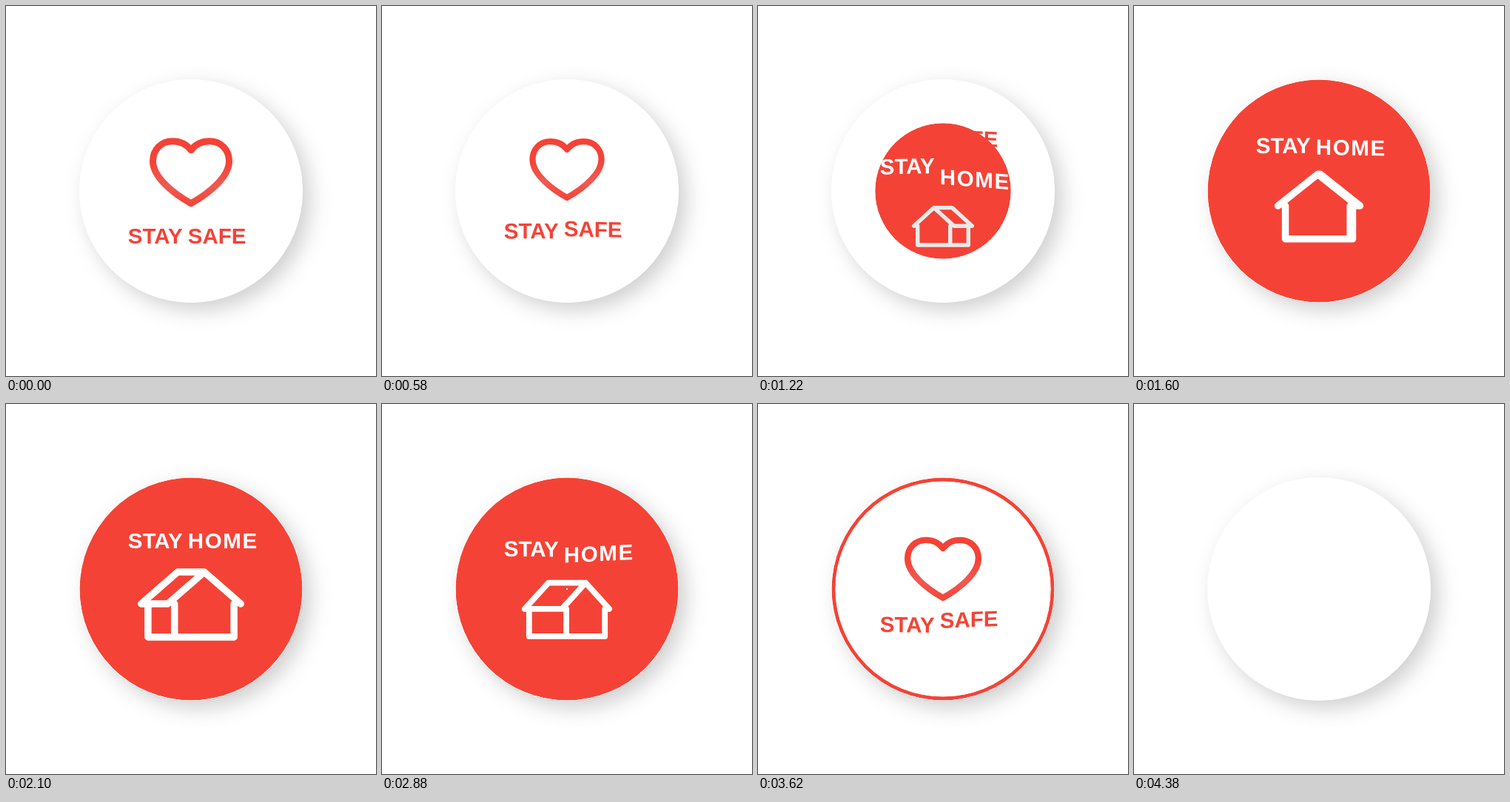
Recreate the animation shown at these times as an HTML page. Size 500 by 500 pixels, loop 4400 ms.

```html
<!DOCTYPE html>
<html lang="en">
<head>
<meta charset="utf-8">
<title>Stay safe, stay home</title>
<style>
  html, body { margin: 0; width: 100%; height: 100%; overflow: hidden; background: #fff; }
  svg { display: block; width: 100%; height: 100%; }
  text { font: bold 29.5px "Liberation Sans", Arial, sans-serif; }
  .disc { filter: drop-shadow(10px 10px 14px rgba(0, 0, 0, .19)); }
  .icon { fill: none; stroke-linecap: round; stroke-linejoin: round; }
</style>
</head>
<body>
<svg viewBox="0 0 500 500">
  <defs>
    <linearGradient id="glow" gradientUnits="userSpaceOnUse" x1="0" y1="-46" x2="0" y2="46">
      <stop offset=".35" stop-color="#f44336"/>
      <stop offset=".7" stop-color="#ee5a52"/>
      <stop offset="1" stop-color="#f44336"/>
    </linearGradient>
    <clipPath id="safeClip"><circle cx="250" cy="250" r="151"/></clipPath>
    <clipPath id="homeClip"><circle cx="250" cy="250" r="151"/></clipPath>
  </defs>
  <circle class="disc" cx="250" cy="250" r="151" fill="#fff"/>
  <g id="stage">
    <g id="safe" clip-path="url(#safeClip)">
      <circle cx="250" cy="250" fill="#fff"/>
      <g class="content" fill="#f44336">
        <path class="icon" stroke="url(#glow)" stroke-width="9"
          d="M0-30C-6-38-15-42-25-42C-41-42-51.5-30-51.5-15C-51.5 6-25 28 0 42C25 28 51.5 6 51.5-15C51.5-30 41-42 25-42C15-42 6-38 0-30Z"/>
        <text>STAY</text><text>SAFE</text>
      </g>
    </g>
    <g id="home" clip-path="url(#homeClip)">
      <circle cx="250" cy="250" fill="#f44336"/>
      <g class="content" fill="#fff">
        <path class="icon" stroke="#fff" stroke-width="9.5"/>
        <text>STAY</text><text letter-spacing="1.6">HOME</text>
      </g>
    </g>
  </g>
</svg>
<script>
const LOOP = 4400, HALF = 2200;
const stage = document.getElementById('stage');

function makeScene(id, opts) {
  const el = document.getElementById(id);
  return Object.assign({
    el,
    disc: el.querySelector('circle'),
    clip: document.querySelector(`#${id}Clip circle`),
    content: el.querySelector('.content'),
    icon: el.querySelector('path'),
    words: [...el.querySelectorAll('text')]
  }, opts);
}

// dir: side towards which the scene leaves, and from which it enters
const safe = makeScene('safe', { dir: -1, iconY: 224.7, baseY: 321, radius: 151, secondX: 245.8 });
const home = makeScene('home', { dir: 1, iconY: 271, baseY: 194.7, radius: 150.5, secondX: 245.8 });

const clamp = (v, a = 0, b = 1) => Math.min(b, Math.max(a, v));
const sigmoid = (t, mid, k) => 1 / (1 + Math.exp((mid - t) / k));

// Distance of a word from its resting line; lag is the delay across the word
const WORDS = [
  { x: 164.8, lag: -12, width: 73, reach: 53, away: 85, mid: 1006, k: 171 },
  { x: 0, lag: 30, width: 78, reach: 74, away: 150, mid: 936, k: 135 }
];
const leaving = (t, w) => w.away * sigmoid(t, w.mid, w.k);
function arriving(t, w) {
  if (t < 1100) return w.reach * (2 - clamp((t + 20) / 1120) ** 4);
  return w.reach * clamp((2180 - t) / 1080) ** 4;
}

function discRadius(t) {
  const mid = 1193;
  if (t < mid) return .5 * clamp((t - 388) / (mid - 388)) ** 4;
  return 1 - .5 * clamp(1 - (t - mid) / 466) ** 4;
}

// Square house turned by an angle in degrees
function housePath(deg) {
  const a = Math.abs(deg) * Math.PI / 180, m = deg < 0 ? -1 : 1;
  const front = 88 * Math.cos(a), side = 88 * Math.sin(a), over = 10 * Math.cos(a);
  const right = (front + side) / 2, mid = side - right;
  const peak = (mid + right) / 2;
  const p = (x, y) => `${(m * x).toFixed(2)} ${y}`;
  const line = (...pts) => 'M' + pts.join('L');
  const eave = -1, top = -44, floor = 44;
  const nearEave = p(mid - over, eave), farEave = p(-right - over, eave), tip = p(peak, top);
  return line(farEave, p(peak - side, top), tip, p(right + over, eave)) +
    line(farEave, nearEave, tip) +
    line(p(-right, eave), p(-right, floor), p(right, floor), p(right, eave)) +
    line(p(mid, eave), p(mid, floor));
}

function placeWords(s, t, travel) {
  WORDS.forEach((w, i) => {
    const a = s.dir * travel(t, w), b = s.dir * travel(t - w.lag, w);
    const x = i ? s.secondX : w.x;
    s.words[i].setAttribute('transform',
      `matrix(1 ${(b - a) / w.width} 0 1 ${x} ${s.baseY + a})`);
  });
}

function placeIcon(s, scale, shift) {
  s.icon.setAttribute('transform',
    `translate(250 ${s.iconY + s.dir * shift}) scale(${Math.max(scale, .0001)})`);
  s.icon.style.display = scale > .002 ? '' : 'none';
}

function setRadius(s, r) {
  s.disc.setAttribute('r', r);
  s.clip.setAttribute('r', r);
}

function draw(time) {
  const t = time % LOOP, h = t % HALF;
  const [out, into] = t < HALF ? [safe, home] : [home, safe];
  if (stage.lastElementChild !== into.el) stage.appendChild(into.el);

  setRadius(out, out.radius);
  setRadius(into, into.radius * discRadius(h));

  const gone = clamp((h + 20) / 1080) ** 4;
  placeIcon(out, 1 - gone, 38 * gone);
  const rest = clamp((1774 - h) / 684) ** 4;
  placeIcon(into, 1 - rest, 96 * rest ** 1.5);

  placeWords(out, h, leaving);
  placeWords(into, h, arriving);

  const turn = 45 - 2.1e-5 * Math.max(0, 3100 - t) ** 2;
  const shade = Math.round(255 - (into === home ? 50 * rest : 0));
  home.icon.setAttribute('d', housePath(turn));
  home.icon.setAttribute('stroke', `rgb(${shade},${shade},${shade})`);

  // everything blinks off just before the loop restarts
  safe.content.style.display = t >= 4380 ? 'none' : '';
}

const start = performance.now();
function tick() {
  draw(performance.now() - start);
  requestAnimationFrame(tick);
}
tick();
</script>
</body>
</html>
```
